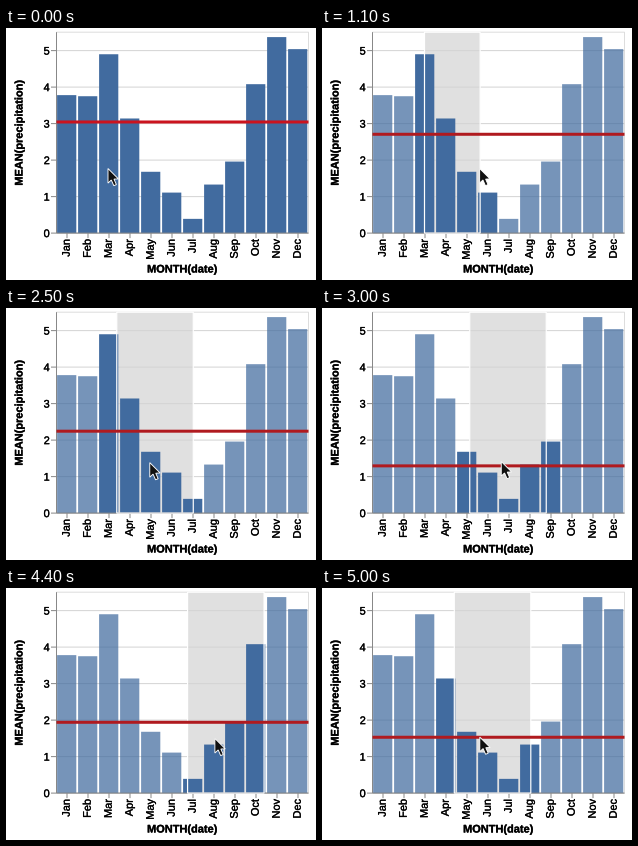
These frames come from a looping animation (310 px wide and 252 px high, 5100 ms). A matplotlib script:

```python
import numpy as np
import matplotlib.pyplot as plt
from matplotlib.animation import FuncAnimation
from matplotlib.patches import Polygon, Rectangle
from matplotlib.patheffects import withStroke

plt.rcParams.update({"font.family": "Liberation Sans", "path.snap": False})

W, H, DPI = 310, 252, 100
FRAMES, INTERVAL = 51, 100
LEFT, RIGHT, TOP, BASE = 50.5, 302.5, 4.2, 205.1
STEP, UNIT = 21, 36.5

# Brush phases, in frames
DRAW, DRAWN, REACH, DRAG, TURN, BACK = 3, 14, 17, 22, 38.5, 39
BRUSH_X, BRUSH_WIDTH = 102.5, 76.5
DRAG_RIGHT, DRAG_LEFT = 94.8, 65

MONTHS = "Jan Feb Mar Apr May Jun Jul Aug Sep Oct Nov Dec".split()
RAIN = np.array([3.78, 3.75, 4.90, 3.14, 1.68, 1.11,
                 0.39, 1.33, 1.96, 4.08, 5.37, 5.04])
BAND = LEFT + STEP * np.arange(len(MONTHS))
ARROW = np.array([(0, 0), (0, 14.6), (3.3, 11.5), (5.8, 17.2), (8.4, 16.1),
                  (6, 10.6), (10.4, 10.4)])


def px(size):
    return size * 72 / DPI


def progress(frame, start, end):
    return min(max((frame - start) / (end - start), 0), 1)


def smooth(u):
    return u * u * (3 - 2 * u)


def brush_span(frame):
    left = (BRUSH_X + DRAG_RIGHT * smooth(progress(frame, DRAG, TURN))
            - DRAG_LEFT * progress(frame, BACK, FRAMES - 1) ** 1.8)
    return left, left + BRUSH_WIDTH * progress(frame, DRAW, DRAWN)


def cursor_tip(frame):
    """Follow the drawn edge, move inside the brush, then hold it with a slow drift."""
    left, right = brush_span(frame)
    held_x = left + 31.5 - 0.3 * (frame - 30)
    held_y = 153.5 - 0.22 * (frame - 30)
    grip = smooth(progress(frame, REACH, DRAG))
    return np.array([right - 0.5 + grip * (held_x - right + 0.5),
                     140.5 + grip * (held_y - 140.5)])


fig = plt.figure(figsize=(W / DPI, H / DPI), dpi=DPI, facecolor="white")
ax = fig.add_axes([0, 0, 1, 1])
ax.set(xlim=(0, W), ylim=(H, 0))
ax.axis("off")


def line(x0, y0, x1, y1, color, width=1, z=1):
    return ax.plot([x0, x1], [y0, y1], color=color, lw=px(width), zorder=z,
                   solid_capstyle="butt")[0]


def label(x, y, text, **style):
    ax.text(x, y, text, fontsize=px(11), color="black",
            path_effects=[withStroke(linewidth=px(0.3), foreground="black")], **style)


def box(x, y, width, height, **style):
    return ax.add_patch(Rectangle((x, y), width, height, **style))


box(LEFT, TOP, RIGHT - LEFT, BASE - TOP, fill=False, ec="#dddddd", lw=px(1), zorder=1)
for value in range(6):
    y = BASE - value * UNIT
    line(LEFT, y, RIGHT, y, "#d4d4d4")
    line(45, y, LEFT, y, "#888888", z=4)
    label(43.7, y, str(value), ha="right", va="center_baseline")
line(LEFT, TOP, LEFT, BASE, "#888888", z=4)
line(LEFT, BASE, RIGHT, BASE, "#888888", z=4)

bars = []
for left, month, rain in zip(BAND, MONTHS, RAIN):
    bars.append(box(left + 0.6, BASE - rain * UNIT, 19.2, rain * UNIT,
                    fc="#416b9f", lw=0, zorder=3))
    center = left + STEP / 2
    line(center, BASE, center, BASE + 5, "#888888", z=4)
    label(center - 0.3, 211, month, rotation=90, ha="center", va="top")

label(176.5, 241.5, "MONTH(date)", weight="bold", ha="center", va="center")
label(13.5, 104.5, "MEAN(precipitation)", weight="bold", rotation=90,
      ha="center", va="center")

brush = [box(0, TOP, 0, BASE - TOP, fc="#e0e0e0", lw=0, zorder=0),
         box(0, TOP, 0, BASE - TOP, fill=False, ec="white", lw=px(1.2), zorder=5)]
mean_line = line(LEFT, 0, RIGHT, 0, "#b01a1f", 3, 6)
cursor = ax.add_patch(Polygon(ARROW, fc="#111111", ec="white", lw=px(0.9),
                              joinstyle="miter", zorder=8))


def update(frame):
    brushing = frame > DRAW
    left, right = brush_span(frame)
    picked = (BAND < right) & (BAND + STEP > left) | (not brushing)

    for bar, on in zip(bars, picked):
        bar.set_alpha(1 if on else 0.72)
    for part in brush:
        part.set(x=left, width=right - left, visible=brushing)

    y = BASE - RAIN[picked].mean() * UNIT
    mean_line.set(ydata=[y, y], color="#b01a1f" if brushing else "#cb131e")
    cursor.set_xy(ARROW + cursor_tip(frame))
    return [*bars, *brush, mean_line, cursor]


animation = FuncAnimation(fig, update, frames=FRAMES, interval=INTERVAL,
                          repeat=True, repeat_delay=0, blit=False)
plt.show()
```
